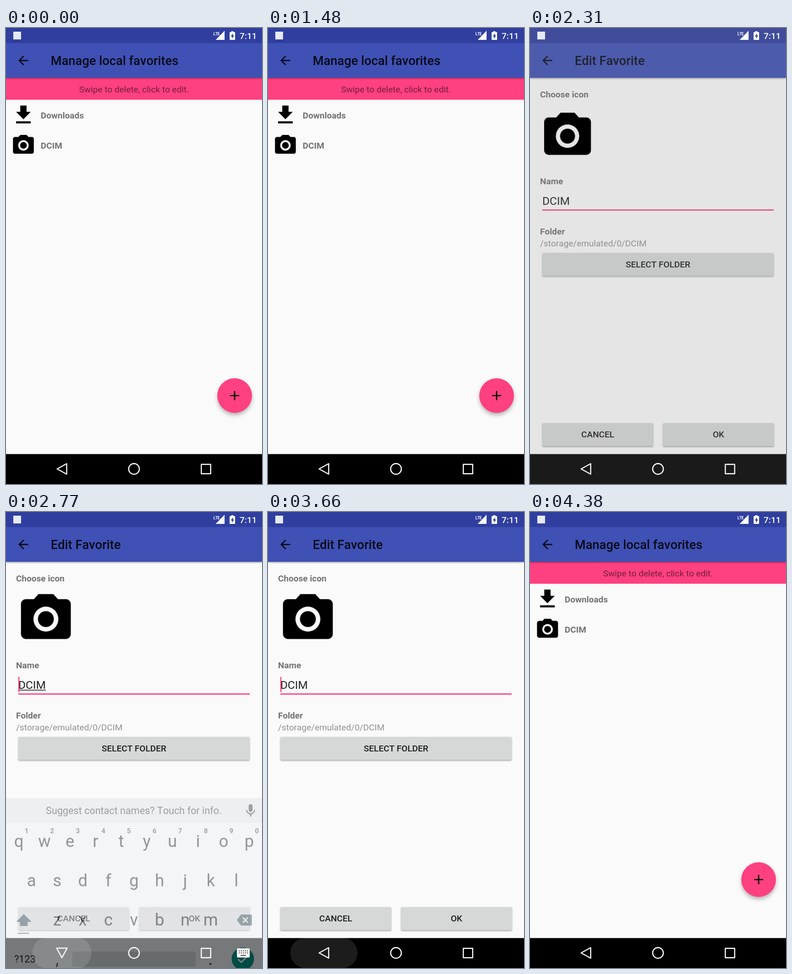
Recreate the animation shown at these times as an HTML page. Size 561 by 998 pixels, loop 4.48 s.

```html
<!DOCTYPE html>
<html lang="en">
<head>
<meta charset="utf-8">
<title>Edit a favorite</title>
<style>
  html, body { margin: 0; width: 100%; height: 100%; overflow: hidden; background: #000; }
  svg { display: block; width: 561px; height: 998px; font: 400 19.1px Roboto, sans-serif; font-kerning: none; }
  .bold { font-weight: 700; fill: #737373; }
  .title { font-weight: 500; font-size: 27.4px; fill-opacity: .87; }
  .mid { text-anchor: middle; }
  .raised { filter: drop-shadow(0 2px 1.5px rgba(0, 0, 0, .32)); }
  .cap { font-weight: 500; fill-opacity: .87; text-anchor: middle; }
  .fab { filter: drop-shadow(0 5px 4px rgba(0, 0, 0, .28)); }
  #keys text { fill: #263238; }
  #keys .letter { font-size: 36.5px; text-anchor: middle; }
  #keys .hint { font-weight: 700; font-size: 15px; fill: #455861; text-anchor: middle; }
  #pill { transform-box: fill-box; transform-origin: center; }
  #back { transform-origin: 122.5px 965px; }
</style>
</head>
<body>
<svg viewBox="0 0 561 998" xmlns="http://www.w3.org/2000/svg">
  <g id="list"></g>
  <rect id="veil" width="561" height="998" fill="#898989"/>
  <g id="edit"></g>
  <g id="camera">
    <path transform="translate(-12 -12)" fill-rule="evenodd" d="M9 2L7.17 4H4c-1.1 0-2 .9-2 2v12c0 1.1.9 2 2 2h16c1.1 0 2-.9 2-2V6c0-1.1-.9-2-2-2h-3.17L15 2H9zM12 17a5 5 0 1 1 0-10a5 5 0 0 1 0 10zM12 15.2a3.2 3.2 0 1 0 0-6.4a3.2 3.2 0 0 0 0 6.4z"/>
  </g>
  <g id="keys"></g>
  <rect id="pill" x="49" y="932" width="147" height="66" rx="33" fill="#fff"/>

  <g id="status" fill="#fff">
    <rect x="16" y="8" width="17" height="17" fill="#e6eaf7"/>
    <text x="454.5" y="15.5" font-size="8.5" font-weight="700" letter-spacing="-.4">LTE</text>
    <path d="M479 6V26H459.5Z"/>
    <path fill-rule="evenodd" d="M493.5 7h5v2h3.5v17h-12V9h3.5zM497.5 11.5L492.5 18.5H495.3V23.5L500 16.5H497.5z"/>
    <text x="512" y="24" font-weight="500">7:11</text>
  </g>
  <g id="nav" fill="none" stroke="#fff" stroke-width="2.4" stroke-linejoin="round">
    <path id="back" d="M112 965L133 953.5V976.5Z"/>
    <circle cx="280.5" cy="965" r="11.7"/>
    <rect x="428" y="955" width="20.5" height="20.5"/>
    <g id="picker" stroke="none">
      <rect x="506" y="955" width="28" height="20" rx="2.5" fill="#fff"/>
      <path d="M510 960.5H531M510 965H531" stroke="#666" stroke-width="2.5" stroke-dasharray="2.5 2"/>
      <path d="M514 970.5H526" stroke="#666" stroke-width="2.5"/>
    </g>
  </g>
</svg>
<script>
const LOOP = 4480;
const PINK = '#ff4081';
const $ = id => document.getElementById(id);

const text = (x, y, s, cls = '', more = '') => `<text x="${x}" y="${y}" class="${cls}" ${more}>${s}</text>`;
const rect = (x, y, w, h, fill, more = '') =>
  `<rect x="${x}" y="${y}" width="${w}" height="${h}" fill="${fill}" ${more}/>`;
const path = (d, more = '') => `<path d="${d}" ${more}/>`;
const button = (x, y, w, label) =>
  rect(x, y, w, 50.5, '#d6d7d7', 'rx="2.7" class="raised"') + text(x + w / 2, y + 31.8, label, 'cap');

// Page background, status bar, toolbar and navigation bar
const page = (title, body) =>
  rect(0, 0, 561, 998, '#fafafa') + body +
  rect(0, 33, 561, 76, '#3f51b5', 'class="raised"') +
  rect(0, 0, 561, 33, '#303f9f') + rect(0, 932.5, 561, 66, '#000') +
  path('M20 11H7.83l5.59-5.59L12 4l-8 8 8 8 1.41-1.41L7.83 13H20z',
    'transform="translate(21.6 54.7) scale(1.364)" fill-opacity=".87"') +
  text(98, 81, title, 'title');

$('list').innerHTML = page('Manage local favorites',
  rect(0, 109, 561, 48, PINK) +
  text(280.5, 141, 'Swipe to delete, click to edit.', 'mid', 'fill-opacity=".54"') +
  path('M19 9h-4V3H9v6H5l7 7zM5 18v2h14v-2z', 'transform="translate(10.7 163) scale(2.29)"') +
  text(76, 198, 'Downloads', 'bold') + text(76, 264, 'DCIM', 'bold') +
  `<circle cx="501" cy="804.5" r="38" fill="${PINK}" class="fab"/>` +
  path('M491 804.5H511M501 794.5V814.5', 'stroke="#000" stroke-width="2.7"'));

$('edit').innerHTML = page('Edit Favorite',
  text(22, 152, 'Choose icon', 'bold') + text(22, 342, 'Name', 'bold') +
  text(27, 387, 'DCIM', '', 'font-size="24.55" fill-opacity=".87"') +
  rect(27, 389, 60, 1.6, '#222', 'id="compose"') +
  rect(27, 361, 2.4, 33, PINK, 'id="caret"') +
  rect(27, 397, 507, 2.7, PINK) +
  text(22, 452, 'Folder', 'bold') +
  text(22, 478, '/storage/emulated/0/DCIM', '', 'fill-opacity=".42"') +
  button(27, 492, 507, 'SELECT FOLDER') +
  button(27, 864.5, 243, 'CANCEL') + button(291.5, 864.5, 243, 'OK'));

const keyRow = (chars, x, y) => [...chars].map((c, i) => text(x + 56.1 * i, y, c, 'letter')).join('');
const hints = [...'1234567890'].map((c, i) => text(45 + 56.1 * i, 648, c, 'hint')).join('');
$('keys').innerHTML =
  rect(0, 571, 561, 401, '#eceff1') + rect(0, 571, 561, 54, '#dfe4e7') +
  text(280, 606, 'Suggest contact names? Touch for info.', 'mid', 'font-size="21.7" style="fill:#37474f"') +
  path('M12 14c1.66 0 3-1.34 3-3V5a3 3 0 0 0-6 0v6c0 1.66 1.34 3 3 3zM17.3 11c0 3-2.54 5.1-5.3 5.1S6.7 14 6.7 11H5c0 3.41 2.72 6.23 6 6.72V21h2v-3.28c3.28-.48 6-3.3 6-6.72z',
    'transform="translate(519 581.5) scale(1.42)" fill="#37474f"') +
  hints + keyRow('qwertyuiop', 28, 678) + keyRow('asdfghjkl', 56, 764) + keyRow('zxcvbnm', 112, 850) +
  path('M39 825L56 842H47.5V851H30.5V842H22Z', 'fill="#546e7a"') + rect(26, 866, 24, 2.2, '#546e7a') +
  path('M506 838L515 826H536Q539 826 539 829V847Q539 850 536 850H515Z', 'fill="#546e7a"') +
  path('M519 832.5L530 843.5M530 832.5L519 843.5', 'stroke="#fff" stroke-width="2.6"') +
  text(18, 931, '?123', '', 'font-size="21.8"') +
  rect(145, 907, 271, 33, '#cfd5d8', 'rx="4"') +
  text(112, 936, ',', 'letter') + text(448, 936, '.', 'letter') +
  '<circle cx="519" cy="923" r="24.5" fill="#009688"/>' +
  path('M508.5 923.5L515.5 930.5L530 916', 'fill="none" stroke="#fff" stroke-width="3"');

// Steps are [time, value, easing towards the next step]
function play(id, prop, steps) {
  const [first, last] = [steps[0], steps[steps.length - 1]];
  const all = [[0, first[1]], ...steps, [LOOP, last[1]]];
  $(id).animate(
    all.map(([t, v, easing = 'linear']) => ({ offset: t / LOOP, [prop]: v, easing })),
    { duration: LOOP, iterations: Infinity });
}
const between = (id, on, off, prop = 'opacity', idle = 0, active = 1) =>
  play(id, prop, [[on, idle], [on, active], [off, active], [off, idle]]);

const EASE = 'cubic-bezier(.4, 0, .2, 1)';
const small = 'translate(38.2px, 256.9px) scale(2.29)';
const big = 'translate(87.4px, 234.3px) scale(5.46)';
const shift = y => `translateY(${y}px)`;

play('camera', 'transform', [[2070, small, EASE], [2455, big], [4110, big, EASE], [4410, small]]);
play('veil', 'opacity', [[2070, 0], [2240, 1], [2600, 1], [2600, 0]]);
play('edit', 'opacity', [[2130, 0], [2352, 1], [4110, 1], [4360, 0]]);
between('caret', 2450, 4360);
between('compose', 2690, 3010);

play('keys', 'transform', [[2650, shift(150)], [2770, shift(56)], [2870, shift(-39)],
  [3010, shift(-39)], [3070, shift(0)], [3105, shift(45)]]);
play('keys', 'opacity', [[2650, 0], [2770, .5], [2870, 1], [3010, 1], [3070, .42], [3105, 0]]);

between('back', 2690, 3010, 'transform', 'rotate(0deg)', 'rotate(-90deg)');
between('picker', 2690, 3010);

play('pill', 'transform', [[2700, 'scale(.6, 1)'], [2770, 'scale(.88, 1)'], [2870, 'scale(1)'],
  [3390, 'scale(1)'], [3390, 'scale(.8, 1)'], [3440, 'scale(1)']]);
play('pill', 'opacity', [[2700, 0], [2770, .13], [2870, .13], [3070, .03], [3110, 0],
  [3380, 0], [3440, .09], [3660, .11], [3870, .11], [3960, 0]]);
</script>
</body>
</html>
```
